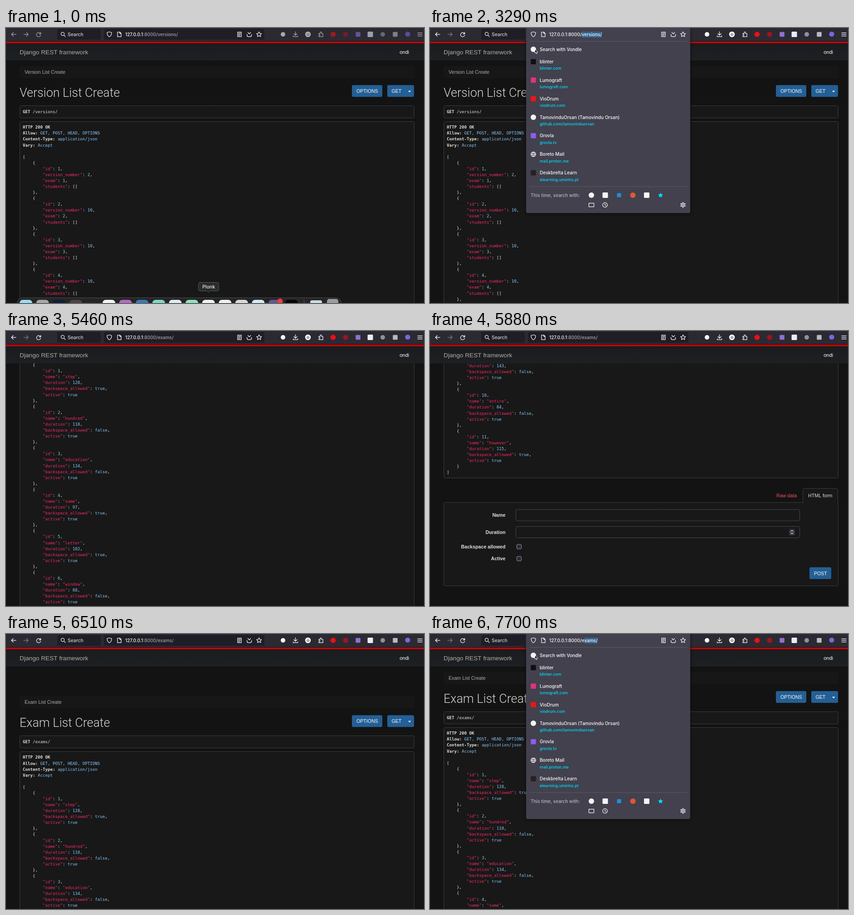
An HTML page with a canvas that plays this animation: 922x607 px, repeating every 8 s.

```html
<!DOCTYPE html>
<html lang="en">
<head>
<meta charset="utf-8">
<title>API browser</title>
<style>
html, body { margin: 0; width: 100%; height: 100%; overflow: hidden; background: #131313; }
canvas { display: block; width: 922px; height: 607px; }
</style>
</head>
<body>
<canvas id="stage"></canvas>
<script>
const W = 922, H = 607, LOOP = 8000;
const canvas = document.getElementById('stage');
const ctx = canvas.getContext('2d');
const dpr = window.devicePixelRatio || 1;
canvas.width = W * dpr;
canvas.height = H * dpr;

const SANS = '"Liberation Sans", Arial, sans-serif';
const LIGHT = 'Roboto, "Liberation Sans", sans-serif';
const CHROME = 'Inter, "Liberation Sans", sans-serif';
const MONO = '"DejaVu Sans Mono", monospace';
const INK = '#e2dfda', BRIGHT = '#fbfbfe', BLUE = '#86c9fd', PINK = '#f62a68', CYAN = '#00ddff';
const LINE = '#3b3d3e', PANEL = '#181818', POPUP = '#42414d', SELECT = '#35648f';
const HOST = '127.0.0.1', PREFIX = HOST + ':8000/';
const LH = 13.08, BOTTOM = 992.6, UI_SIZE = 10.05, LINK_SIZE = 8.95;

const ICON = {
  back: 'M5 0H-5M-1 -4L-5 0L-1 4',
  next: 'M-5 0H5M1 -4L5 0L1 4',
  reload: 'M4 -2A4.6 4.6 0 1 0 4.4 1.5M4.6 -5V-1.5H1',
  search: 'M2.6 -1A3.6 3.6 0 1 1 -4.6 -1A3.6 3.6 0 1 1 2.6 -1M1.6 1.6L5 5',
  shield: 'M0 -5.5L5 -4C5 2 3 4 0 5.5C-3 4 -5 2 -5 -4Z',
  page: 'M-4 -5H1L4 -2V5H-4ZM1 -5V-2H4',
  reader: 'M-4 -5H4V5H-4ZM-2 -2.5H2M-2 0H2M-2 2.5H1',
  tray: 'M-5 0V2Q-5 5 -2 5H2Q5 5 5 2V0M-3 -4L0 -1L3 -4',
  star: 'M0 -5.6L1.7 -2L5.6 -1.6L2.7 1L3.5 5L0 3L-3.5 5L-2.7 1L-5.6 -1.6L-1.7 -2Z',
  download: 'M0 -6V2M-3.5 -1.5L0 2L3.5 -1.5M-5 3V5H5V3',
  puzzle: 'M-4 -2H-1V-4A1.5 1.5 0 0 1 2 -4V-2H5V5H-4V3H-3A1.5 1.5 0 0 0 -3 0H-4Z',
  menu: 'M-5 -3.5H5M-5 0H5M-5 3.5H5',
  tab: 'M-5.5 -4H5.5V4H-5.5Z',
  clock: 'M5.2 0A5.2 5.2 0 1 1 -5.2 0A5.2 5.2 0 1 1 5.2 0M0 -3V0L2 1.5',
  globe: 'M5.2 0A5.2 5.2 0 1 1 -5.2 0A5.2 5.2 0 1 1 5.2 0M-5 0H5M0 -5C-3 -2 -3 2 0 5C3 2 3 -2 0 -5',
  gear: 'M4.2 0A4.2 4.2 0 1 1 -4.2 0A4.2 4.2 0 1 1 4.2 0M1.7 0A1.7 1.7 0 1 1 -1.7 0A1.7 1.7 0 1 1 1.7 0M0 -4V-6M0 4V6M3.5 -2L5.2 -3M3.5 2L5.2 3M-3.5 -2L-5.2 -3M-3.5 2L-5.2 3',
  spin: 'M-2.5 -1.5L0 -4L2.5 -1.5M-2.5 1.5L0 4L2.5 1.5'
};
for (const k in ICON) ICON[k] = new Path2D(ICON[k]);

// Drawing helpers

function setFont(size, face = SANS, weight = 'normal') {
  ctx.font = `${weight} ${size}px ${face}`;
}

// y is the middle of the capitals
function text(s, x, y, size, color, { weight, align = 'left', face } = {}) {
  setFont(size, face, weight);
  ctx.textAlign = align;
  ctx.fillStyle = color;
  ctx.fillText(s, x, y + size * 0.36);
  ctx.textAlign = 'left';
  return ctx.measureText(s).width;
}

function label(s, x, y, color = BRIGHT, size = UI_SIZE, options) {
  return text(s, x, y, size, color, { face: CHROME, weight: 500, ...options });
}

function rect(x, y, w, h, fill, r = 0, border) {
  ctx.beginPath();
  const k = border ? 0.5 : 0;
  ctx.roundRect(x + k, y + k, w - 2 * k, h - 2 * k, r);
  if (fill) { ctx.fillStyle = fill; ctx.fill(); }
  if (border) { ctx.strokeStyle = border; ctx.lineWidth = 1; ctx.stroke(); }
}

function dot(x, y, r, fill) {
  ctx.beginPath();
  ctx.arc(x, y, r, 0, 7);
  ctx.fillStyle = fill;
  ctx.fill();
}

function square(x, y, size, fill) {
  rect(x - size / 2, y - size / 2, size, size, fill, 1.5);
}

function icon(name, x, y, color, filled) {
  ctx.save();
  ctx.translate(x, y);
  ctx.lineCap = ctx.lineJoin = 'round';
  ctx.lineWidth = 1.25;
  ctx.strokeStyle = ctx.fillStyle = color;
  filled ? ctx.fill(ICON[name]) : ctx.stroke(ICON[name]);
  ctx.restore();
}

// Page content

function listing(items) {
  const out = ['['];
  items.forEach((item, i) => {
    out.push('    {');
    const keys = Object.keys(item);
    keys.forEach((k, j) => out.push(
      `        "${k}": ${JSON.stringify(item[k])}${j < keys.length - 1 ? ',' : ''}`));
    out.push(i < items.length - 1 ? '    },' : '    }');
  });
  out.push(']');
  return out;
}

const versions = [2, 10, 10, 10, 10, 10].map((v, i) =>
  ({ id: i + 1, version_number: v, exam: i + 1, students: [] }));

const exams = [
  ['step', 128, true], ['hundred', 118, false], ['education', 134, false], ['same', 97, true],
  ['letter', 102, true], ['window', 88, false], ['garden', 121, true], ['simple', 109, false],
  ['through', 143, false], ['entire', 84, false], ['however', 115, true]
].map(([name, duration, backspace_allowed], i) =>
  ({ id: i + 1, name, duration, backspace_allowed, active: true }));

const pages = {
  versions: { title: 'Version List Create', path: 'versions/', lines: listing(versions) },
  exams: { title: 'Exam List Create', path: 'exams/', lines: listing(exams) }
};

function code(parts, x, y) {
  for (const [s, color, weight] of parts) {
    x += text(s, x, y, 9.15, color, { face: MONO, weight });
  }
}

function jsonLine(s, y) {
  const parts = s.split(/("[^"]*"|\b\d+\b|true|false)/).filter(Boolean)
    .map(p => [p, p[0] === '"' ? PINK : /^\w/.test(p) ? BLUE : INK]);
  code(parts, 37, y);
}

function button(x, y, w, caption, tx) {
  rect(x, y, w, 26, '#245f95', 3);
  text(caption, tx, y + 13.3, 10.6, '#ffffff');
}

function form() {
  rect(30, 378, 871, 185, PANEL, 3, LINE);
  rect(822, 347, 78, 36, PANEL, 3, LINE);
  rect(823, 379, 76, 6, PANEL);
  text('Raw data', 764, 363, 10.7, '#f4505c');
  text('HTML form', 834, 363, 10.7, INK);
  [['Name', 406.5], ['Duration', 444], ['Backspace allowed', 476], ['Active', 502.5]].forEach(([name, y], i) => {
    text(name, 166.5, y, 10.7, INK, { weight: 'bold', align: 'right' });
    if (i < 2) rect(189, y - 13, 627, 26, PANEL, 3, '#45484a');
    else rect(191, y - 5.5, 11, 11, '#2b2a33', 2, '#9a99a5');
  });
  rect(792, 437, 13, 14, '#35343d', 2);
  icon('spin', 798.5, 444, '#c9c8cf');
  button(837, 521.5, 48, 'POST', 847);
}

function drawPage(page, scroll) {
  rect(0, 28, W, H - 28, '#131313');
  ctx.save();
  ctx.translate(0, -scroll);
  rect(30, 84, 871, 27, '#171718', 3);
  text(page.title, 41, 97.5, 10.65, '#b2ada5');
  text(page.title, 30, 142.3, 26.9, '#d6d3ce', { face: LIGHT, weight: 300 });
  button(763, 126, 67, 'OPTIONS', 773);
  button(841, 126, 59, 'GET', 850.5);
  ctx.fillStyle = '#ffffff';
  ctx.beginPath();
  ctx.moveTo(887, 138.5); ctx.lineTo(893.4, 138.5); ctx.lineTo(890.2, 142);
  ctx.fill();
  rect(30, 171, 871, 28, PANEL, 3, LINE);
  code([['GET', INK, 'bold'], [' /' + page.path, INK]], 37, 185);

  const n = page.lines.length;
  rect(30, 206, 871, 219 + (n + 4) * LH + 13 - 206, PANEL, 3, LINE);
  code([['HTTP 200 OK', INK, 'bold']], 37, 219);
  [['Allow:', 'GET, POST, HEAD, OPTIONS'], ['Content-Type:', 'application/json'], ['Vary:', 'Accept']]
    .forEach(([k, v], i) => code([[k, INK, 'bold'], [' ' + v, BLUE]], 37, 219 + (i + 1) * LH));
  page.lines.forEach((s, i) => {
    const y = 219 + (i + 5) * LH;
    if (y - scroll > 50 && y - scroll < H + 15) jsonLine(s, y);
  });
  if (page === pages.exams) {
    ctx.translate(0, BOTTOM);
    form();
  }
  ctx.restore();

  const bar = ctx.createLinearGradient(0, 34, 0, 71);
  bar.addColorStop(0, '#1a1c1e');
  bar.addColorStop(1, '#1d2023');
  rect(0, 33, W, 38.5, bar);
  rect(0, 30, W, 3.6, '#cc0505');
  text('Django REST framework', 30, 53.5, 13.7, '#b2ada5');
  text('ondi', 889, 53.5, 11, '#ffffff', { align: 'right' });
}

// Browser chrome

function drawToolbar(active) {
  rect(0, 0, W, 29, '#2b2a33');
  rect(0, 29, W, 1, '#101014');
  rect(113, 2, 96, 24, '#1f1e26', 3);
  rect(216, 2, 354, 24, '#1f1e26', 3);
  const dim = active ? 1 : 0.6;
  ctx.globalAlpha = dim;
  icon('back', 17, 14, BRIGHT);
  icon('reload', 72, 14.5, BRIGHT);
  ctx.globalAlpha = active ? 0.4 : 0.55;
  icon('next', 44, 14, BRIGHT);
  ctx.globalAlpha = 0.9;
  icon('search', 126, 14, BRIGHT);
  label('Search', 136, 14.3, '#e4e4ea', 10.3);
  ctx.globalAlpha = dim;
  dot(611, 14, 5, BRIGHT);
  icon('download', 638.5, 14, BRIGHT);
  dot(666, 14, 6.2, BRIGHT);
  text('O', 666, 14.2, 8, '#2b2a33', { weight: 'bold', align: 'center' });
  icon('puzzle', 694, 14, BRIGHT);
  dot(721.5, 14, 5.8, '#ee1010');
  dot(749, 14, 5.6, '#a31220');
  square(776.5, 14, 10.5, '#9070d0');
  square(803.5, 14, 12, '#e8edf2');
  dot(831, 14, 5, '#8e929b');
  square(858.5, 14, 10.5, '#b9b8c0');
  dot(886, 13.5, 5.6, '#7668dc');
  icon('menu', 913, 14, BRIGHT);
  ctx.globalAlpha = 1;
}

function drawAddress({ path, mode, sel, caret }) {
  const url = PREFIX + path, typing = mode === 'typing', focus = mode !== 'idle';
  const x = typing ? 242 : 263;
  setFont(UI_SIZE, CHROME, 500);
  const at = i => x + ctx.measureText(url.slice(0, i)).width;
  if (sel) rect(at(sel[0]), 8, at(sel[1]) - at(sel[0]), 13, SELECT);
  const w = label(HOST, x, 14.3);
  label(url.slice(HOST.length), x + w, 14.3, focus ? BRIGHT : '#a3a2ab');
  if (caret != null) rect(Math.round(at(caret)), 8, 1, 13, BRIGHT);
  if (typing) {
    icon('search', 228, 14, BRIGHT);
    icon('next', 558, 14, BRIGHT);
  } else {
    ['shield', 'page'].forEach((n, i) => icon(n, 228 + i * 22, 14, BRIGHT));
    ['reader', 'tray', 'star'].forEach((n, i) => icon(n, 515 + i * 21.6, 14, BRIGHT));
  }
}

function popupBox(bottom) {
  ctx.save();
  ctx.shadowColor = 'rgba(0,0,0,.55)';
  ctx.shadowBlur = 8;
  ctx.shadowOffsetY = 2;
  rect(212, -6, 362, bottom + 6, POPUP, 4);
  ctx.restore();
  rect(219, 29, 349, 1, '#5c5b68');
  const y = bottom - 39.5;
  rect(219, bottom - 59, 349, 1, '#5c5b68');
  label('This time, search with:', 222, y, '#b7b6c1');
  dot(356, y, 6, '#f4f4f6');
  square(386.5, y, 12, '#f6f6f6');
  square(417, y, 9, '#1b8fe0');
  dot(447.5, y, 6, '#de5833');
  square(478, y, 12, '#f6f6f6');
  icon('star', 508.5, y, CYAN, true);
  icon('tab', 356, y + 21.5, BRIGHT);
  icon('clock', 386, y + 21.5, BRIGHT);
  icon('gear', 558, y + 21.5, BRIGHT);
}

const sites = [
  ['blinter', 'blinter.com', '#101012'],
  ['Lumograft', 'lumograft.com', '#e0347c'],
  ['VioDrum', 'viodrum.com', '#f01414'],
  ['TamovinduOrsan (Tamovindu Orsan)', 'github.com/tamovinduorsan', 'round'],
  ['Grovla', 'grovla.tv', '#8c5cf0'],
  ['Boreto Mail', 'mail.proton.me', 'globe'],
  ['Deskbrelta Learn', 'elearning.uminho.pt', '#25221f']
];

function topSites() {
  popupBox(408.5);
  dot(228, 47, 6, '#f4f4f6');
  label('Search with Vondle', 242, 47);
  sites.forEach(([name, url, mark], i) => {
    const y = 74.2 + i * 40.9;
    if (mark === 'round') dot(228, y, 6, '#f4f4f6');
    else if (mark === 'globe') icon('globe', 228, y, BRIGHT);
    else square(228, y, 11.5, mark);
    label(name, 242, y);
    label(url, 242, y + 15, CYAN, LINK_SIZE);
  });
  pointer(231.5, 47);
}

function matchRow(typed) {
  popupBox(137);
  icon('globe', 228, 47, BRIGHT);
  label('Exam List Create – Django REST framework', 242, 47);
  let x = 242 + label('http://', 242, 62, CYAN, LINK_SIZE);
  x += label(PREFIX + 'exams/'.slice(0, typed), x, 62, CYAN, LINK_SIZE, { weight: 700 });
  label('exams/'.slice(typed), x, 62, CYAN, LINK_SIZE);
  pointer(231.5, 47);
}

function pointer(x, y) {
  ctx.save();
  ctx.translate(x, y);
  ctx.beginPath();
  [[0, 0], [0, 8.6], [2, 6.8], [3.4, 9.8], [4.8, 9.2], [3.5, 6.2], [6.2, 6]]
    .forEach(p => ctx.lineTo(...p));
  ctx.closePath();
  ctx.fillStyle = '#0a0a0a';
  ctx.strokeStyle = '#ffffff';
  ctx.lineWidth = 1;
  ctx.fill();
  ctx.stroke();
  ctx.restore();
}

const dockColors = ['#9adcf2', '#a9a6a2', '#141c3c', '#4a4543', '', '#f0f3f6', '#b46ac0', '#3b78b8',
  '#7fd8c4', '#dfeaf2', '#8fe0c0', '#eef0f2', '#eef2ee', '#d8d8d8', '#d4e8f4', '#5d5a92', '#050505'];

function drawDock(t) {
  if (t >= 210) return;
  ctx.save();
  ctx.translate(0, Math.floor(t / 70) * 4.5);
  rect(24, 595, 716, 60, '#242527', 12, '#4a4b4d');
  dockColors.forEach((c, i) => c && rect(30 + i * 36.6, 600, 28, 28, c, 7));
  rect(657, 600, 1, 20, '#5a5b5d');
  rect(671, 601, 26, 26, '#c9dbe4', 4);
  rect(708, 598, 25, 26, '#9a9c9e', 5);
  dot(604.5, 603, 6, '#f03a3a');
  ctx.restore();
  if (t >= 70) return;
  rect(424, 561, 46, 20, '#2a2b2c', 4, '#56585a');
  ctx.beginPath();
  ctx.moveTo(442, 580); ctx.lineTo(447, 586); ctx.lineTo(452, 580);
  ctx.fillStyle = '#2a2b2c';
  ctx.fill();
  label('Plonk', 447, 571.3, '#ececec', 10.6, { align: 'center' });
}

// Timeline

const scrollKeys = [[5320, 0], [5780, BOTTOM], [6180, BOTTOM], [6490, -53.4], [7000, 0]];

function scrollAt(t) {
  let [t0, v0] = scrollKeys[0];
  for (const [t1, v1] of scrollKeys) {
    if (t < t1) {
      const u = Math.max(0, (t - t0) / (t1 - t0 || 1));
      return v0 + (v1 - v0) * u * u * (3 - 2 * u);
    }
    [t0, v0] = [t1, v1];
  }
  return 0;
}

function addressAt(t) {
  const start = PREFIX.length;
  if (t < 1680) return { path: 'versions/', mode: 'idle' };
  if (t < 3710) {
    const a = { path: 'versions/', mode: 'popup' };
    if (t < 2590) a.sel = [0, start + 9];
    else if (t >= 3080) a.sel = [start, start + Math.min(9, 3 + 2 * Math.floor((t - 3080) / 70))];
    else if (t >= 2870) a.caret = start;
    return a;
  }
  if (t < 4760) {
    const typed = 1 + [3920, 4060, 4200, 4410].filter(k => t >= k).length;
    return { path: 'exams/', mode: 'typing', typed, sel: [start + typed, start + 6] };
  }
  if (t < 7630) return { path: 'exams/', mode: 'idle' };
  return { path: 'exams/', mode: 'popup', sel: [t < 7700 ? 0 : start + 1, start + 6] };
}

function draw(t) {
  ctx.setTransform(dpr, 0, 0, dpr, 0, 0);
  const address = addressAt(t);
  drawPage(t < 4760 ? pages.versions : pages.exams, scrollAt(t));
  drawToolbar(t >= 1680);
  if (address.mode === 'popup') topSites();
  else if (address.mode === 'typing') {
    if (t < 4620) matchRow(address.typed);
    else rect(216, 2, 354, 24, POPUP, 3);
  }
  drawAddress(address);
  drawDock(t);
}

const began = performance.now();
function tick() {
  draw((performance.now() - began) % LOOP);
  requestAnimationFrame(tick);
}
tick();
</script>
</body>
</html>
```
